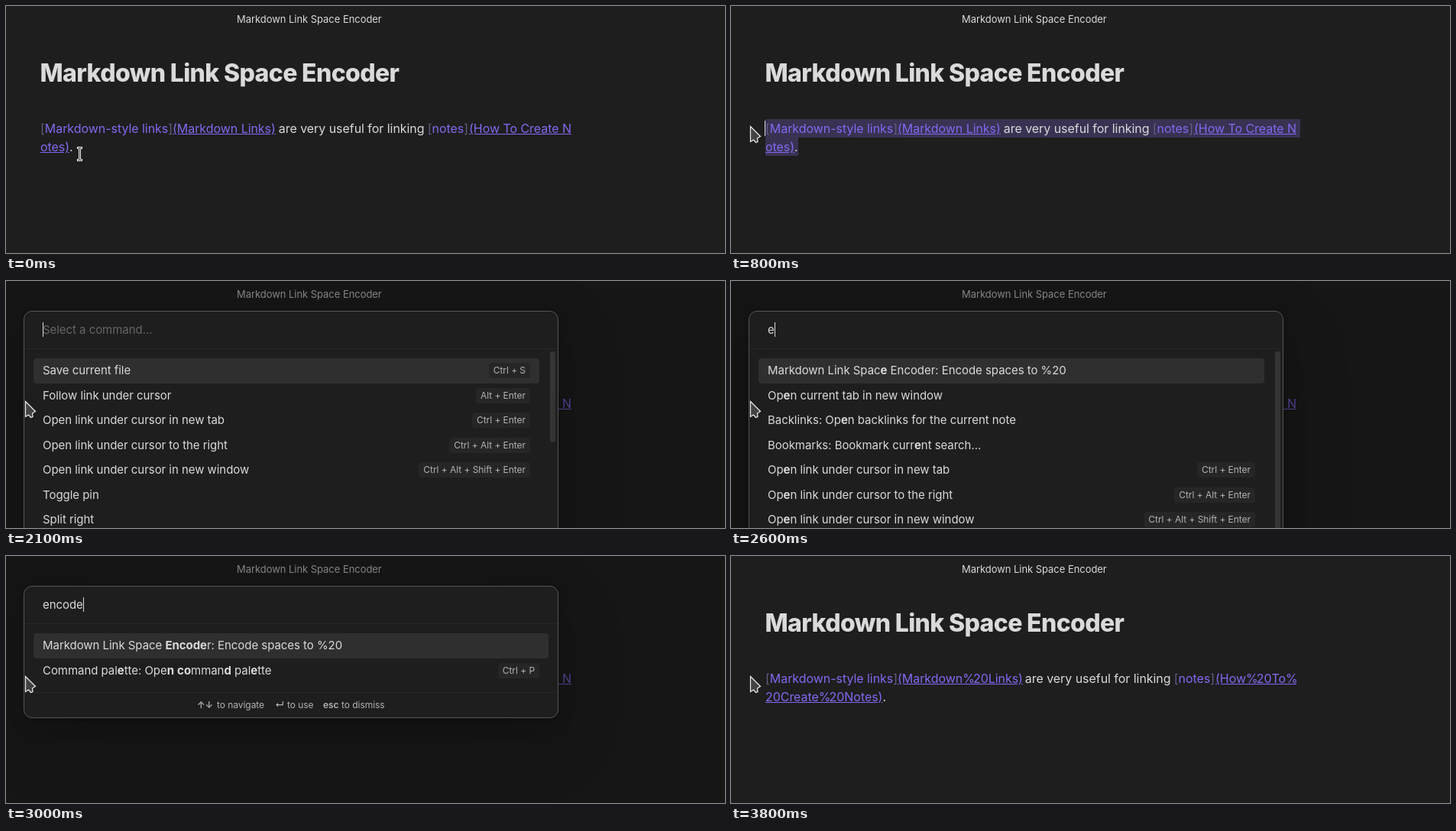
These frames come from a looping animation (941 by 323 pixels, 4100 ms). An HTML page with a canvas:

```html
<!DOCTYPE html>
<html lang="en">
<head>
<meta charset="utf-8">
<title>Markdown Link Space Encoder</title>
<style>
  html, body { margin: 0; width: 100%; height: 100%; overflow: hidden; background: #1e1e1e; }
  #stage {
    position: absolute; left: 0; top: 0; width: 941px; height: 323px; overflow: hidden;
    background: #1e1e1e; color: #dadada; letter-spacing: -0.003em;
    font: 400 16px/24px Inter, sans-serif; font-optical-sizing: none;
  }
  #stage div, #pointer { position: absolute; white-space: pre; box-sizing: border-box; }
  .layer { left: 0; top: 0; width: 941px; height: 323px; }
  .head { font-size: 13px; line-height: 20px; }
  .title { font-weight: 800; font-size: 32px; line-height: 39px; letter-spacing: -0.02em; }
  .link, u { color: #8668f0; }
  i { font-style: normal; color: #665c85; }
  .pct { letter-spacing: -0.12em; }
  .sel { background: #393252; }
  .caret { width: 1px; background: #dadada; }
  .dim { background: rgba(10, 10, 10, .4); }
  .modal {
    left: 23px; top: 39px; width: 700px; background: #1e1e1e;
    border: 1px solid #555; border-radius: 11px;
    box-shadow: 0 1.8px 7.3px rgba(0,0,0,.07), 0 6.3px 24.7px rgba(0,0,0,.11), 0 30px 90px rgba(0,0,0,.2);
  }
  .input { font-size: 15px; line-height: 48px; }
  .input span { display: inline-block; width: 1px; height: 19px; margin-right: -1px; background: #dadada; vertical-align: -4px; }
  .hint { color: #666; }
  .rule { background: #272727; }
  .row { height: 32.5px; padding: 8px 12px; font-size: 15px; line-height: 16.5px; border-radius: 4px; }
  .row b { font-weight: 700; }
  .on { background: rgba(255, 255, 255, .075); }
  .key {
    right: 12px; top: 6px; height: 20px; padding: 0 6px; border-radius: 4px;
    background: #262626; color: #b3b3b3; font-size: 12px; line-height: 20px;
  }
  .bar { left: 712px; top: 92px; width: 7px; border-radius: 4px; background: #343434; }
  .foot { font-size: 12px; line-height: 20px; color: #b3b3b3; }
  .foot b { font-weight: 600; }
</style>
</head>
<body>
<div id="stage">
  <div id="scene" class="layer"></div>
  <canvas id="pointer" class="layer" width="941" height="323"></canvas>
</div>
<script>
const LOOP = 4100;
const scene = document.getElementById('scene');
const ctx = document.getElementById('pointer').getContext('2d');

const put = (cls, x, y, html) => `<div class="${cls}" style="left:${x}px;top:${y}px">${html}</div>`;
const box = (cls, x, y, w, h) =>
  `<div class="${cls}" style="left:${x}px;top:${y}px;width:${w}px;height:${h}px"></div>`;

const COMMANDS = [
  ['Save current file', 'Ctrl + S'],
  ['Follow link under cursor', 'Alt + Enter'],
  ['Open link under cursor in new tab', 'Ctrl + Enter'],
  ['Open link under cursor to the right', 'Ctrl + Alt + Enter'],
  ['Open link under cursor in new window', 'Ctrl + Alt + Shift + Enter'],
  ['Toggle pin'],
  ['Split right']
];
const ENCODE = ['Markdown Link Space Encoder: Encode spaces to %20'];
const MATCHES = [
  ENCODE,
  ['Open current tab in new window'],
  ['Backlinks: Open backlinks for the current note'],
  ['Bookmarks: Bookmark current search...'],
  ...COMMANDS.slice(2, 5)
];
const FINAL = [ENCODE, ['Command palette: Open command palette', 'Ctrl + P']];

// Bold the query as a whole word part, or letter by letter in order.
function mark(text, query) {
  if (!query) return text;
  const low = text.toLowerCase();
  const at = low.indexOf(query);
  if (at >= 0) {
    const end = at + query.length;
    return `${text.slice(0, at)}<b>${text.slice(at, end)}</b>${text.slice(end)}`;
  }
  let n = 0;
  return [...text].map((c, i) => low[i] === query[n] ? (n++, `<b>${c}</b>`) : c)
    .join('').replaceAll('</b><b>', '');
}

const url = text => `<u>${text.replaceAll('%', '<span class="pct">%</span>')}</u>`;

function note(encoded) {
  const dx = encoded ? 28 : 0;
  return put('head', 302, 7, 'Markdown Link Space Encoder') +
    put('title', 44.5, 68, 'Markdown Link Space Encoder') +
    put('link', 45, 148, '<i>[</i>Markdown-style links<i>]</i>') +
    put('', 218, 148, url(encoded ? '(Markdown%20Links)' : '(Markdown Links)')) +
    put('', 356.8 + dx, 148, 'are very useful for linking') +
    put('link', 551.8 + dx, 148, '<i>[</i>notes<i>]</i>') +
    put('', 606 + dx, 148, url(encoded ? '(How%20To%' : '(How To Create N')) +
    put('', 45, 172, url(encoded ? '20Create%20Notes)' : 'otes)') + '.');
}

function palette(query) {
  const done = query === 'encode';
  const list = done ? FINAL : query ? MATCHES : COMMANDS;
  const width = done ? 674 : 662;
  const rows = list.map(([name, key], i) =>
    `<div class="row${i ? '' : ' on'}" style="left:36px;top:${101 + 32.5 * i}px;width:${width}px">` +
    mark(name, query) + (key ? `<div class="key">${key}</div>` : '') + '</div>').join('');
  const foot = [[250, '<b>↑↓</b>'], [276, 'to navigate'], [352, '<b>↵</b>'],
    [368, 'to use'], [415, '<b>esc</b>'], [439, 'to dismiss']];
  return '<div class="layer dim"></div>' +
    `<div class="modal" style="height:${done ? 173 : 420}px"></div>` +
    (query ? '' : put('input hint', 48, 40, 'Select a command...')) +
    put('input', 48, 40, query + '<span></span>') +
    box('rule', 24, 88, 698, 1) + rows +
    (done
      ? box('rule', 24, 178, 698, 1) + foot.map(([x, s]) => put('foot', x, 185, s)).join('')
      : `<div class="bar" style="height:${query ? 320 : 119}px"></div>`);
}

function selection(t) {
  if (t < 500 || t >= 2100) return '';
  if (t < 700) {
    const x = t < 600 ? 78 : 55;
    return box('sel', x, 172, 88 - x, 24);
  }
  return box('sel', 45, 148, 700, 24) + box('sel', 45, 172, 43, 24);
}

function caret(t) {
  if (t < 300) return '';
  if (t < 500) return box('caret', 88, 174, 1, 20);
  if (t < 700) return box('caret', t < 600 ? 78 : 54, 174, 1, 20);
  if (t < 1200 || (t >= 1700 && t < 2100)) return box('caret', 44, 150, 1, 20);
  if (t >= 3200 && t < 3800) return box('caret', 203, 174, 1, 20);
  return '';
}

function typed(t) {
  if (t < 2600) return '';
  return t >= 3000 ? 'encode' : 'encode'.slice(0, Math.floor((t - 2500) / 100));
}

const PATH = [[0, 96, 193], [300, 93, 184], [400, 93, 184], [600, 54, 175], [800, 25, 157]];

function place(t) {
  const i = PATH.findIndex(p => p[0] > t);
  if (i < 0) return PATH[PATH.length - 1].slice(1);
  const [a, b] = [PATH[i - 1], PATH[i]];
  const k = (t - a[0]) / (b[0] - a[0]);
  return [a[1] + (b[1] - a[1]) * k, a[2] + (b[2] - a[2]) * k];
}

function stroke(color, width) {
  ctx.strokeStyle = color;
  ctx.lineWidth = width;
  ctx.stroke();
}

function drawPointer(t) {
  const [x, y] = place(t).map(Math.round);
  ctx.clearRect(0, 0, 941, 323);
  ctx.save();
  ctx.translate(x + .5, y + .5);
  ctx.beginPath();
  if (x < 45) {
    [[0, 0], [0, 20], [4, 17.5], [7, 21], [9.5, 20], [9, 15.5], [13, 13]]
      .forEach(p => ctx.lineTo(...p));
    ctx.closePath();
    ctx.fillStyle = '#434343';
    ctx.fill();
    stroke('#eeeeee', 1.2);
  } else {
    ctx.moveTo(-2, -8); ctx.lineTo(2, -8);
    ctx.moveTo(0, -8); ctx.lineTo(0, 8);
    ctx.moveTo(-2, 8); ctx.lineTo(2, 8);
    ctx.lineCap = 'square';
    stroke('#f0f0f0', 3);
    stroke('#3c3c3c', 1);
  }
  ctx.restore();
}

let shown = '';
function frame(now) {
  const t = Math.floor((now % LOOP) / 100) * 100;
  const open = t >= 2100 && t < 3200;
  const html = selection(t) + note(t >= 3200) + caret(t) + (open ? palette(typed(t)) : '');
  if (html !== shown) scene.innerHTML = shown = html;
  drawPointer(t);
  requestAnimationFrame(frame);
}
frame(0);
</script>
</body>
</html>
```
